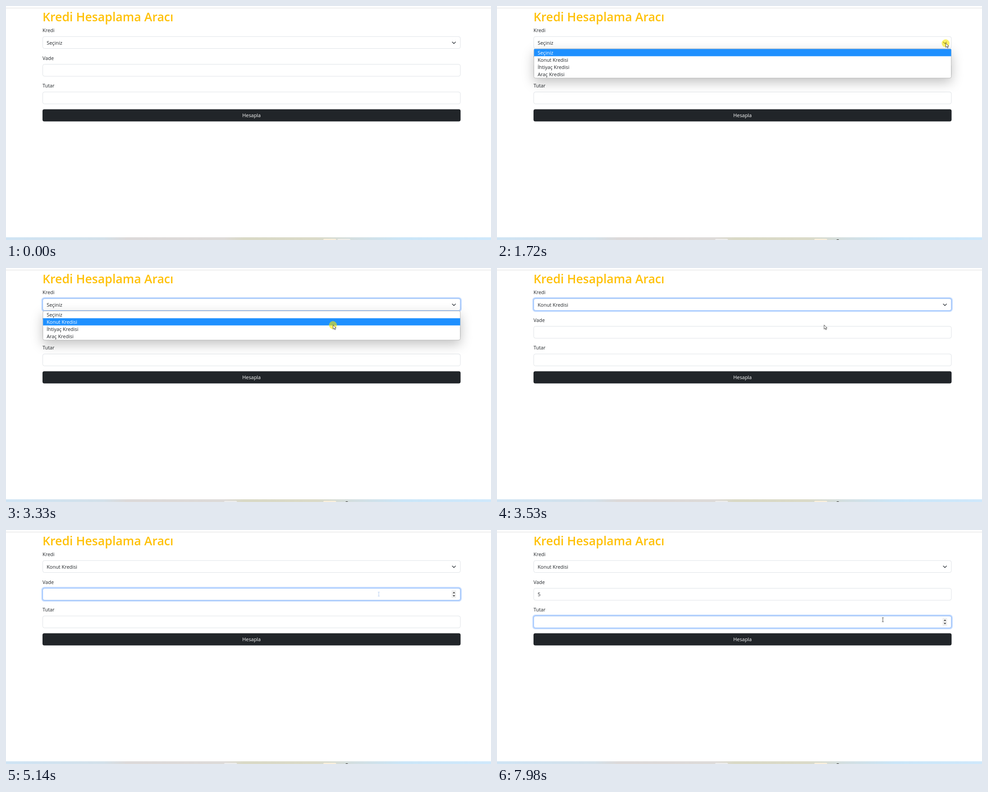
Animation of 1076 by 520 pixels, one loop 8000 ms. Source, as an HTML page:

```html
<!DOCTYPE html>
<html lang="tr">
<head>
<meta charset="utf-8">
<title>Kredi Hesaplama Aracı</title>
<style>
  html, body { margin: 0; width: 100%; height: 100%; overflow: hidden; background: #fff; }
  svg { display: block; width: 1076px; height: 520px; }
  text { font: 10.9px "Open Sans", "Noto Sans", sans-serif; fill: #212529; }
  .title { font-size: 26.7px; font-weight: 600; fill: #ffc107; }
  .light { fill: #fff; }
  .box { fill: #fff; stroke: #dee2e6; stroke-width: 1; }
  .popup { filter: drop-shadow(0 9px 13px rgba(0, 0, 0, .24)); }
</style>
</head>
<body>
<svg id="stage" viewBox="0 0 1076 520">
  <defs>
    <linearGradient id="bar">
      <stop offset="0" stop-color="#cfe4f4"/>
      <stop offset=".2" stop-color="#d3e1ea"/>
      <stop offset=".25" stop-color="#dcd9d9"/>
      <stop offset=".45" stop-color="#dddad8"/>
      <stop offset=".49" stop-color="#d9d9c6"/>
      <stop offset=".64" stop-color="#dadac8"/>
      <stop offset=".72" stop-color="#d3dfe2"/>
      <stop offset=".82" stop-color="#cae6f8"/>
      <stop offset="1" stop-color="#cfe8fb"/>
    </linearGradient>
  </defs>
</svg>
<script>
const LOOP = 8000;
const stage = document.getElementById('stage');

function add(tag, attrs, parent = stage) {
  const el = document.createElementNS('http://www.w3.org/2000/svg', tag);
  for (const key in attrs) el.setAttribute(key, attrs[key]);
  parent.append(el);
  return el;
}
function label(str, x, y, attrs = {}, parent = stage) {
  const el = add('text', { x, y, ...attrs }, parent);
  el.textContent = str;
  return el;
}
const rect = (x, y, width, height, attrs, parent) =>
  add('rect', { x, y, width, height, ...attrs }, parent);
const show = (el, on) => el.setAttribute('opacity', +on);

// Page
rect(0, 4, 1076, 1, { fill: '#dedede' });
label('Kredi Hesaplama Aracı', 81, 33.5, { class: 'title' });

function field(name, y) {
  label(name, 81, y - 9.5);
  rect(81.5, y + .5, 926.5, 26.6, { rx: 4, class: 'box' });
  const ring = add('g', { fill: 'none' });
  rect(80, y - 1, 929.5, 29.6, { rx: 5.2, stroke: '#0d6efd', 'stroke-opacity': .25, 'stroke-width': 3 }, ring);
  rect(81.5, y + .5, 926.5, 26.6, { rx: 4, stroke: '#86b7fe' }, ring);
  const spin = add('g', {});
  rect(988.5, y + 5, 10, 17.5, { fill: '#efefef' }, spin);
  add('path', { d: `M991 ${y + 11.5}l2.8-3 2.8 3zM991 ${y + 16}l2.8 3 2.8-3z`, fill: '#3c3c3c' }, spin);
  const value = label('', 90.2, y + 18.3);
  const caret = rect(90.5, y + 6.3, 1, 15.5, { fill: '#000' });
  return { ring, spin, value, caret };
}
const kredi = field('Kredi', 67.4);
const vade = field('Vade', 129);
const tutar = field('Tutar', 190.5);
add('path', {
  d: 'M990.1 79.9l3.6 3.6 3.6-3.6', fill: 'none', stroke: '#343a40',
  'stroke-width': 1.4, 'stroke-linecap': 'round', 'stroke-linejoin': 'round'
});
rect(81, 229.5, 927.5, 27, { rx: 4, fill: '#212529' });
label('Hesapla', 544.7, 247, { 'text-anchor': 'middle', class: 'light' });

// Taskbar edge
rect(0, 514, 1076, 6, { fill: 'url(#bar)' });
const tab = (x, fill) => rect(x, 517.5, 28.5, 8, { rx: 2, fill });
tab(704, '#fbf0dc');
const tabBefore = tab(735.5, '#efeeea');
const tabAfter = add('g', {});
tabAfter.append(tab(484, '#ededed'));
add('circle', { cx: 756, cy: 522, r: 3.4, fill: '#555' }, tabAfter);

// Option list
const popup = add('g', {});
rect(81.8, 95.4, 926, 64.8, { rx: 3.5, fill: '#fff', stroke: '#a9a9a9', 'stroke-width': .8, class: 'popup' }, popup);
const options = ['Seçiniz', 'Konut Kredisi', 'İhtiyaç Kredisi', 'Araç Kredisi'];
const marker = rect(82.2, 95.6, 925.4, 16, { fill: '#1e90ff' }, popup);
const rows = options.map((name, i) => label(name, 90.2, 108 + 16 * i, {}, popup));

// Pointer
const halo = add('circle', { r: 8.7, fill: '#f7e600', 'fill-opacity': .6 });
const pointer = add('g', {});
const arrow = add('path', {
  d: 'M.4.6v9.3l2.2-2 1.6 3.4 1.5-.7-1.6-3.3h3z',
  fill: '#fff', stroke: '#222', 'stroke-width': .8, 'stroke-linejoin': 'round'
}, pointer);
const beam = add('path', {
  d: 'M-2-4.5h1.4l.6.5.6-.5h1.4M0-4v8M-2 4.5h1.4l.6-.5.6.5h1.4', fill: 'none', 'stroke-width': .9
}, pointer);

// Every step holds until the next one: [ms, x, y, shape]
const path = [
  [0, 0, 0, ''],
  [200, 755, 512, 'arrow'], [300, 842, 499, 'arrow'], [400, 955, 488, 'arrow'],
  [510, 1065, 483, 'arrow'], [610, 0, 0, ''],
  [920, 1050, 148, 'arrow'], [1020, 1034, 124, 'arrow'], [1120, 1016, 102, 'arrow'],
  [1220, 1002, 88, 'arrow'], [1320, 995.3, 82, 'arrow'],
  [1820, 990, 88, 'arrow'], [1920, 962, 100, 'arrow'], [2020, 915, 109, 'arrow'],
  [2130, 860, 116, 'arrow'], [2240, 808, 119, 'arrow'], [2340, 763, 121, 'arrow'],
  [2440, 725.3, 126, 'arrow'],
  [3830, 736, 134, 'beam'], [3930, 762, 145, 'beam'], [4030, 792, 153, 'beam'],
  [4140, 813, 152, 'beam'], [4240, 824, 146, 'beam'], [4350, 827, 142.5, 'pale'],
  [6860, 830, 155.6, 'beam'], [6960, 839, 172, 'arrow'], [7070, 851, 193, 'beam'],
  [7180, 856, 199.4, 'beam']
];
const rings = [
  [kredi, [[0, 0], [1820, .5], [1920, 1], [4640, .5], [4740, 0]]],
  [vade, [[0, 0], [4640, .5], [4740, 1], [7480, .5], [7580, 0]]],
  [tutar, [[0, 0], [7480, .5], [7580, 1]]]
];
const clicks = [[1720, 1820], [3330, 3530], [4550, 4740], [7480, 7580]];
const vadeCaret = [[4640, 5140], [5660, 6160], [6460, 6960]];
const within = (spans, t) => spans.some(([a, b]) => t >= a && t < b);
const held = (steps, t) => steps.findLast(step => step[0] <= t);

function draw(t) {
  const [, x, y, shape] = held(path, t);
  pointer.setAttribute('transform', `translate(${x} ${y})`);
  show(arrow, shape === 'arrow');
  show(beam, shape === 'beam' || shape === 'pale');
  beam.setAttribute('stroke', shape === 'pale' ? '#a9c4ee' : '#333');
  halo.setAttribute('cx', x);
  halo.setAttribute('cy', y + .8);
  show(halo, within(clicks, t));

  for (const [box, steps] of rings) show(box.ring, held(steps, t)[1]);

  const hot = t < 2130 ? 0 : 1;
  show(popup, t >= 1720 && t < 3530);
  marker.setAttribute('y', 95.6 + 16 * hot);
  rows.forEach((row, i) => row.classList.toggle('light', i === hot));

  kredi.value.textContent = options[t < 3530 ? 0 : 1];
  vade.value.textContent = t < 6460 ? '' : '5';
  vade.caret.setAttribute('x', t < 6460 ? 90.5 : 96.3);
  show(kredi.spin, false);
  show(kredi.caret, false);
  show(vade.spin, t >= 3830 && t < 7480);
  show(vade.caret, within(vadeCaret, t));
  show(tutar.spin, t >= 7070);
  show(tutar.caret, t >= 7480 && t < 7980);

  show(tabBefore, t < 1720);
  show(tabAfter, t >= 1720);
}
function tick() {
  draw(performance.now() % LOOP);
  requestAnimationFrame(tick);
}
tick();
</script>
</body>
</html>
```
